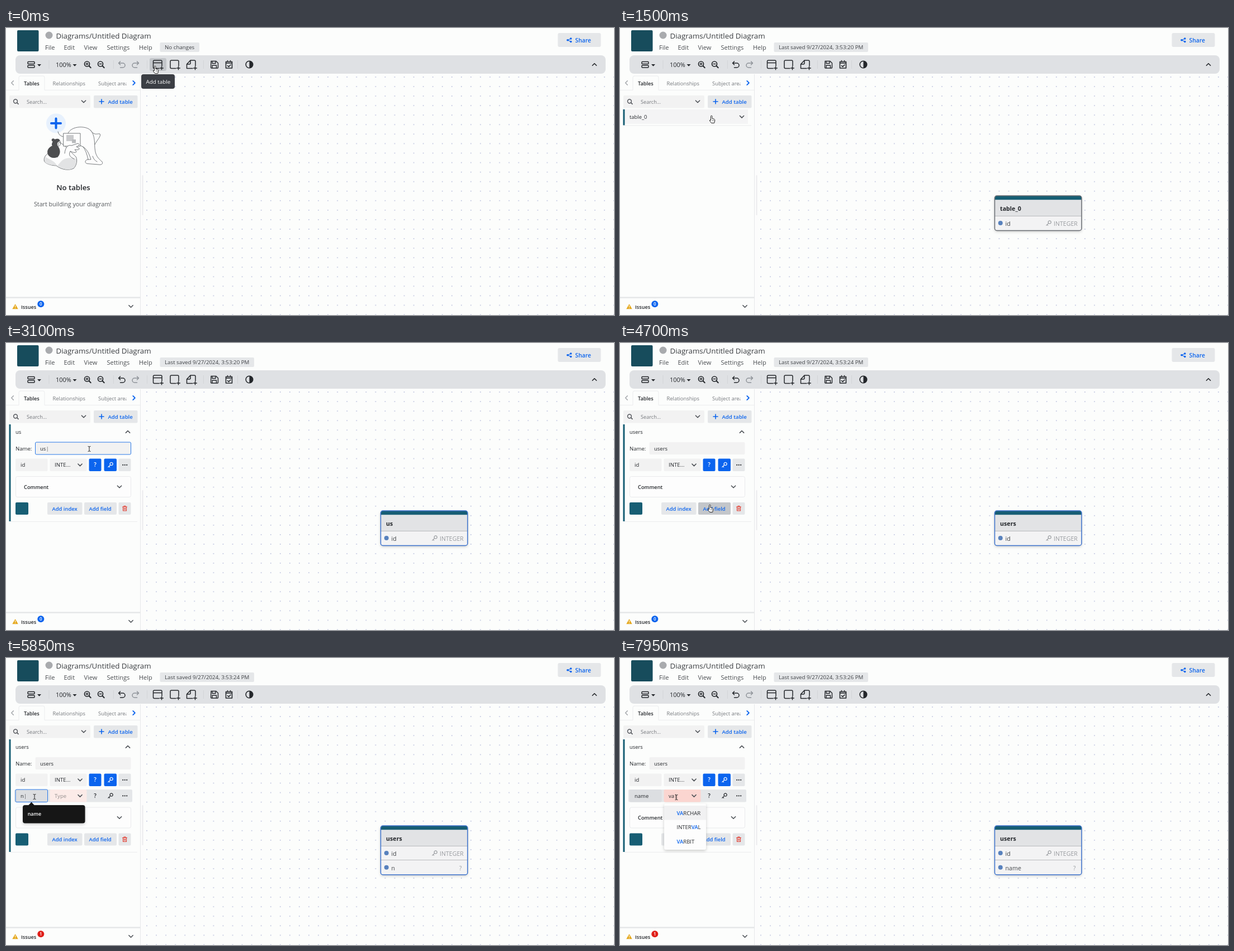
Write an HTML page that moves like this. It is 1088 by 515 pixels and loops after 8 s.

```html
<!DOCTYPE html>
<html lang="en">
<head>
<meta charset="utf-8">
<title>Diagram editor</title>
<style>
html, body { margin: 0; width: 100%; height: 100%; overflow: hidden; background: #fcfdfc; }
svg { display: block; font-family: "Open Sans", "Noto Sans", sans-serif; white-space: pre; }
</style>
</head>
<body>
<svg width="1088" height="515" viewBox="0 0 1088 515">
  <defs>
    <pattern id="dots" x="243.5" y="79.5" width="17.06" height="17.06" patternUnits="userSpaceOnUse">
      <circle cx="8.5" cy="8.5" r=".75" fill="#858fc4"/>
    </pattern>
    <filter id="shadow" x="-20%" y="-20%" width="140%" height="150%">
      <feDropShadow dx="0" dy="2" stdDeviation="2.5" flood-opacity=".2"/>
    </filter>
    <clipPath id="tabClip"><rect x="160" y="86" width="55.5" height="24"/></clipPath>
    <clipPath id="panelClip"><rect id="panelBox" x="0" y="146" width="240" height="0"/></clipPath>
  </defs>
  <g id="base"></g>
  <g id="scene"></g>
</svg>
<script>
const INK = '#24272b', GRAY = '#75787d', BLUE = '#0b64ee', TEAL = '#175e74', BUTTON = '#e5e7e9', FIELD = '#f2f2f2';
const LOOP = 8000;
const base = document.getElementById('base');
const scene = document.getElementById('scene');
const panelBox = document.getElementById('panelBox');

const text = (x, y, size, str, fill = INK, weight = 400, extra = '') =>
  `<text x="${x}" y="${y}" font-size="${size}" fill="${fill}" font-weight="${weight}" ${extra}>${str}</text>`;
const rect = (x, y, w, h, fill, r = 0, extra = '') =>
  `<rect x="${x}" y="${y}" width="${w}" height="${h}" rx="${r}" fill="${fill}" ${extra}/>`;
const circle = (x, y, r, fill, extra = '') => `<circle cx="${x}" cy="${y}" r="${r}" fill="${fill}" ${extra}/>`;
const line = (d, stroke = INK, w = 1.5, fill = 'none') =>
  `<path d="${d}" fill="${fill}" stroke="${stroke}" stroke-width="${w}" stroke-linecap="round" stroke-linejoin="round"/>`;
const shape = (d, fill) => `<path d="${d}" fill="${fill}"/>`;
const group = (x, y, content, extra = '') => `<g transform="translate(${x} ${y})" ${extra}>${content}</g>`;
const chevron = (x, y, angle = 0, color = '#4d5156', w = 1.6) =>
  `<g transform="translate(${x} ${y}) rotate(${angle})">${line('M-3.6 -1.8L0 1.8L3.6 -1.8', color, w)}</g>`;
const plus = (x, y, r, color, w) => line(`M${x - r} ${y}h${2 * r}M${x} ${y - r}v${2 * r}`, color, w);
const key = (x, y, color) => group(x, y,
  circle(1.8, -1.6, 2.6, 'none', `stroke="${color}" stroke-width="1.2"`) + line('M-.2 .4L-4 4.2M-2.6 2.8L-1.2 4.2', color, 1.2));
const more = (x, y) => [-3.5, 0, 3.5].map(d => circle(x + d, y, 1.15, INK)).join('');
const undo = (x, color, flip) =>
  `<g transform="translate(${x} 66) scale(${flip} 1)">${line('M-2.5 -6L-5.5 -3L-2.5 0M-5.5 -3H2A3.9 3.9 0 0 1 2 5H-2.5', color)}</g>`;

function toolbarIcons() {
  const zoom = (x, vertical) => circle(x, 64.5, 4.5, 'none', `stroke="${INK}" stroke-width="1.7"`) +
    line(`M${x + 3.5} 68l3.2 3.2`, INK, 2) + line(`M${x - 2} 64.5h4` + (vertical ? `M${x} 62.5v4` : ''), INK, 1.3);
  return rect(39, 60.5, 12, 4, 'none', 1, `stroke="${INK}" stroke-width="1.5"`) +
    rect(39, 67, 12, 4, 'none', 1, `stroke="${INK}" stroke-width="1.5"`) +
    shape('M56 65h7l-3.5 3.8zM119.500 65h7l-3.500 3.800z', INK) +
    text(89, 70, 10.9, '100%') + zoom(145, true) + zoom(169, false) +
    [76.5, 192, 252, 353, 414].map(x => rect(x, 58, 1, 15, '#d3d5d8')).join('') +
    undo(232, '#8f9399', -1) +
    line('M274 72.500H265.500a2 2 0 0 1-2-2V60a2 2 0 0 1 2-2H277a2 2 0 0 1 2 2V68M263.500 62.500H279', INK, 1.5) + plus(278.5, 72, 2.8, INK, 1.5) +
    line('M304 72.500H296a2 2 0 0 1-2-2V60a2 2 0 0 1 2-2H307a2 2 0 0 1 2 2V68', INK, 1.5) + plus(308.5, 72, 2.8, INK, 1.5) +
    line('M334 72.500H323.500V65L330 58H337a2 2 0 0 1 2 2V68M323.500 65H328a2 2 0 0 0 2-2V58', INK, 1.5) + plus(338.5, 72, 2.8, INK, 1.5) +
    line('M367 59.500h9l3.500 3.500v8a1 1 0 0 1-1 1H368a1.500 1.500 0 0 1-1.500-1.500zM369 59.500v4h6v-4M369 72v-5h7.500v5', INK, 1.4) +
    line('M393.500 60.500h11v11.500h-11zM393.500 63h11M396.500 58.500v2M401.500 58.500v2M396.500 67.500l2 2l3.500-3.500', INK, 1.6) +
    circle(435.5, 65.5, 6.3, 'none', `stroke="${INK}" stroke-width="1.6"`) + shape('M435.500 59.200a6.300 6.300 0 0 1 0 12.600z', INK) +
    chevron(1053, 65.5, 180, INK);
}

function drawBase() {
  const menu = [[70, 'File'], [103.5, 'Edit'], [139.5, 'View'], [180.5, 'Settings'], [238, 'Help']];
  base.innerHTML =
    rect(247, 83, 841, 432, 'url(#dots)') +
    rect(20, 4, 38.5, 38, '#174c5c', 2) + circle(77, 13, 6.5, '#a9abae') +
    text(89.5, 18.5, 13.35, 'Diagrams/Untitled Diagram', '#3b3e42') +
    menu.map(([x, s]) => text(x, 38.8, 11, s, '#4a4d51')).join('') +
    rect(987.5, 9, 77, 25, BUTTON, 3) +
    line('M1011 19L1005 21.700L1011 24.500', BLUE, 1.1) +
    [[1010.8, 19], [1005, 21.7], [1010.8, 24.5]].map(p => circle(...p, 1.8, BLUE)).join('') +
    text(1018.5, 25.8, 10.3, 'Share', BLUE, 600) +
    rect(17, 49, 1056, 33, '#dfe1e4', 8) +
    line('M0 111.500H23V89a3 3 0 0 1 3-3H66a3 3 0 0 1 3 3V111.500H240', '#ebecee', 1) +
    chevron(11.5, 98.5, 90, '#a9acb0') + chevron(229, 98.5, -90, BLUE, 1.8) +
    text(32, 102.8, 9.2, 'Tables', INK, 600) + text(83.5, 102.8, 9.4, 'Relationships', GRAY) +
    `<g clip-path="url(#tabClip)">${text(165, 102.8, 9.4, 'Subject areas', GRAY)}</g>` +
    rect(6, 121, 145, 22.5, FIELD, 2) +
    circle(17, 131.5, 3.4, 'none', 'stroke="#55585d" stroke-width="1.5"') + line('M19.700 134l2.300 2.300', '#55585d', 1.7) +
    text(37, 136, 9.2, 'Search...', GRAY) + chevron(139, 132) +
    rect(157, 121, 78.5, 22.5, BUTTON, 2) + plus(171, 132, 4, BLUE, 1.6) + text(182.5, 136.2, 9.6, 'Add table', BLUE, 600) +
    rect(240, 83, 1, 432, '#e6e7e9') + rect(241, 83, 6, 432, '#fcfcfc') + rect(243.5, 264, 2, 72, '#ececee', 1) +
    rect(0, 482.5, 240, 2.5, '#e6e7e9') +
    shape('M16.500 495.200L21.700 504.200H11.300z', '#e5a81c') + rect(16, 498, 1, 3, '#fff') + rect(16, 502, 1, 1, '#fff') +
    text(27, 503.7, 9.1, 'Issues', INK, 600) + chevron(223.5, 499.5);
}

// Placeholder picture for the list without tables
function emptyState() {
  const pen = (d, fill = 'none') => line(d, '#55585c', .8, fill);
  return circle(89.5, 171, 17.5, '#e7f1fd') +
    pen('M93 186q1 7 9 9') +
    pen('M151 183C158 194 163 189 168 190C171 194 162 202 159 209') +
    pen('M111 189C116 177 137 175 148 181C160 189 158 206 159 216C160 229 165 234 172 240C174 244 171 246 165 245L146 243.500C140 243 141 236 147 236H152C147 220 142 214 133 211', '#fdfdfd') +
    pen('M147 236q-3-15-9-23M155 230q2 7 8 10') +
    pen('M78 224C71 226 67 233 68.500 239C72 245 84 247 90 247C100 255 113 256 121 252C127 246 128 236 125 231C115 222 104 208 95 205C91 209 96 222 92 232', '#fdfdfd') +
    shape('M70 231C76 235 86 238 91 246C82 247 69 244 69 238z', '#e2e3e4') +
    shape('M99 239C107 231 119 233 126 235C126 248 121 254 111 254Q99 253 92 247z', '#e2e3e4') +
    pen('M103 189h30v23h-30z', '#fdfdfd') +
    rect(108, 192, 13, 11, '#c9cacc') + rect(118, 200, 7, 6.5, '#b9bbbd') +
    pen('M105 225C106 214 111 209 117 211L129 207C133 209 130 212 126 213L131 216C132 219 127 219 123 218L126 222C125 225 119 223 115 221C111 229 116 232 122 235', '#fdfdfd') +
    pen('M90 202q4-3 7 1q2 6-2 9') +
    shape('M83 211C80 210 84 201 88 199.500C92 198 97 199 96 203C94 205 91 204 92 211C98 217 98 226 93 231C87 235 78 233 75 227C72 219 77 214 83 211z', '#4d4e50') +
    circle(84.5, 201, 2.8, '#4d4e50') +
    plus(89.5, 171, 8.5, BLUE, 4) +
    text(120.5, 291, 13.2, 'No tables', INK, 600, 'text-anchor="middle"') +
    text(50, 320, 10.7, 'Start building your diagram!', '#55585c');
}

// Returns the newest value of a list of [time, value] steps
const at = (t, steps) => steps.reduce((now, s) => t >= s[0] ? s : now);
const NAME = [[0, 'table_0'], [2900, 'u'], [3050, 'us'], [3250, 'use'], [3400, 'user'], [3550, 'users']];
const COLUMN = [[0, ''], [5750, 'n'], [5950, 'na'], [6100, 'nam'], [6300, 'name']];
const TYPE = [[7250, ''], [7700, 'v'], [7900, 'va']];
const PATH = [[0, 268, 75], [650, 268, 75], [1400, 165, 164], [1800, 165, 164], [2250, 149, 190], [3800, 149, 190],
  [4600, 162, 297], [5000, 162, 297], [5500, 51, 249], [6350, 51, 249], [6750, 73, 248], [6900, 73, 248], [7250, 101, 250], [8000, 101, 250]];
const SHAPES = [[0, 'hand'], [800, 'arrow'], [1300, 'hand'], [2050, 'beam'], [3950, 'arrow'], [4450, 'hand'], [5150, 'arrow'], [5350, 'beam']];
const STATUS = [[0, 'No changes'], [900, 'Last saved 9/27/2024, 3:53:20 PM'], [4150, 'Last saved 9/27/2024, 3:53:24 PM'], [7350, 'Last saved 9/27/2024, 3:53:26 PM']];
const CURSORS = {
  hand: line('M-2.500 1V-5.500a1.200 1.200 0 0 1 2.400 0V-1.500L3.500 -.700Q5 0 4.700 2L3.700 6.500H-1.500L-4.800 2Q-4.600 .200 -2.500 1.500z', '#222', 1, '#fff') + line('M.500 1v2M2.500 1v2', '#222', .6),
  arrow: line('M-3.500 -6V5L-1 2.700L.700 6.500L2.300 5.800L.700 2.300H4z', '#222', .9, '#fff'),
  beam: line('M-2 -4.500Q0 -4.500 0 -3.500Q0 -4.500 2 -4.500M0 -3.500V3.500M-2 4.500Q0 4.500 0 3.500Q0 4.500 2 4.500', '#222', 1)
};
const caret = (t, since) => (t - since) % 1000 < 500 ? '<tspan font-weight="300" fill="#111">|</tspan>' : '';

function pointer(t) {
  const i = Math.max(1, PATH.findIndex(p => p[0] > t));
  const [a, b] = [PATH[i - 1], PATH[i]];
  const u = (t - a[0]) / (b[0] - a[0]), e = u * u * (3 - 2 * u);
  return group(a[1] + (b[1] - a[1]) * e, a[2] + (b[2] - a[2]) * e, CURSORS[at(t, SHAPES)[1]]);
}

function fieldRow(y, name, type, active, nameExtra = '') {
  const color = active ? '#fff' : INK, fill = active ? BLUE : 'none';
  return rect(17, y, 57.5, 22.5, active ? FIELD : '#dcdee1', 2, nameExtra) + text(26, y + 14.7, 9.5, name) +
    type + chevron(132.5, y + 11.3) +
    rect(148.5, y, 22, 22.5, fill, 2) + text(159.5, y + 14.9, 10, '?', color, 600, 'text-anchor="middle"') +
    rect(175.5, y, 22.5, 22.5, fill, 2) + key(186.8, y + 11, color) +
    rect(201.5, y, 22, 22.5, active ? BUTTON : 'none', 2) + more(212.7, y + 11.3);
}

function panel(t, name, hasColumn) {
  const focus = 'stroke="#2878e8" stroke-width="1"';
  const naming = t >= 2350 && t < 4150;
  const selected = t >= 2600 && t < 2900;
  const [typed, label] = at(t, NAME);
  const shift = hasColumn ? 28.5 : 0;
  let out = text(17, 193, 9.6, 'Name:') +
    rect(52.5, 178, 171, 22, FIELD, 2, naming ? focus : '') +
    (selected ? rect(60.5, 182, 33, 14, '#1a73d9') : '') +
    text(61, 193.3, 9.5, label + (naming && !selected ? caret(t, Math.max(typed, 2350)) : ''), selected ? '#fff' : INK) +
    fieldRow(207.5, 'id', rect(78.5, 207.5, 66, 22.5, FIELD, 2) + text(87, 222.3, 9.6, 'INTE...'), true);
  if (hasColumn) {
    const editing = t >= 5550 && t < 7250, choosing = t >= 7250;
    const [when, column] = at(t, COLUMN);
    const [pressed, query] = at(t, TYPE);
    const typeBox = rect(78.5, 236, 66, 22.5, choosing ? '#fbd5d0' : '#fcebe8', 2) +
      text(87, 250.8, 9.6, choosing && query ? query + caret(t, pressed) : 'Type' + (choosing ? caret(t, 7250) : ''), choosing && query ? INK : '#96908f');
    out += (t >= 5350 ? rect(15, 236, 211, 22.5, '#e5e7e9', 2) : rect(148.500, 236, 75, 22.500, BUTTON, 2)) +
      fieldRow(236, column + (editing ? caret(t, Math.max(when, 5550)) : ''), typeBox, false, editing ? focus : '');
  }
  const hover = t >= 4450 && t < 5150 ? '#c3c6ca' : BUTTON;
  out += group(0, shift,
    rect(17.5, 239.5, 206, 37, '#fdfdfd', 3, 'stroke="#e9eaec"') + text(32, 261.8, 9.3, 'Comment', INK, 600) + chevron(203, 258) +
    rect(17, 286, 23, 22, TEAL, 2) +
    rect(74, 286, 62.5, 22, BUTTON, 2) + text(82.5, 300.5, 9.4, 'Add index', BLUE, 600) +
    rect(140, 286, 58, 22, hasColumn ? BUTTON : hover, 2) + text(148.5, 300.5, 9.4, 'Add field', BLUE, 600) +
    rect(201.5, 286, 22, 22, BUTTON, 2) +
    line('M208.500 294h8M211 294v-1.500h3v1.500M209.500 294v7h6v-7M211.500 296v3M213.500 296v3', '#e23b2e', 1.1));
  return out;
}

function sidebar(t, name, hasColumn) {
  const u = Math.min(1, Math.max(0, (t - 1850) / 200));
  const full = hasColumn ? 202 : 174;
  const height = 28.5 + (full - 28.5) * (1 - (1 - u) ** 2);
  panelBox.setAttribute('height', height);
  return (t >= 1250 && t < 2050 ? rect(8, 146, 221, 26, '#f4f4f5') : '') +
    rect(8, 146 + height, 227, 1, '#ececee') +
    `<g clip-path="url(#panelClip)">${rect(5.5, 146, 3, 220, TEAL)}${u > 0 ? panel(t, name, hasColumn) : ''}</g>` +
    text(17, 163, 9.4, name, INK, 500) + chevron(218, 159.3, 180 * u);
}

function canvasTable(t, name, hasColumn) {
  const height = hasColumn ? 88 : 62.5;
  const edge = t >= 1850 ? '#3c72cc' : '#696d73';
  const dot = y => circle(680.8, y, 4, '#5881bd');
  return rect(670.5, 301, 155.5, height, '#f3f3f4', 4, 'filter="url(#shadow)"') +
    shape('M671 308.500V305a4 4 0 0 1 4-4H822a4 4 0 0 1 4 4V308.500z', TEAL) +
    rect(671, 308.5, 155, 28.5, '#e2e3e5') + rect(671, 337, 155, 1, '#b9bbbe') +
    text(680, 327.5, 10.7, name, INK, 700) +
    dot(350) + text(689.5, 354.6, 10.9, 'id', '#44474b') + key(767, 350, '#999ca0') + text(776, 354.6, 10.6, 'INTEGER', '#999ca0') +
    (hasColumn ? rect(671, 362, 155, 1, '#b9bbbe') + dot(375.8) +
      text(689.5, 380.5, 10.7, at(t, COLUMN)[1], '#44474b') + text(811, 380.5, 10.6, '?', '#999ca0') : '') +
    rect(670.5, 301, 155.5, height, 'none', 4, `stroke="${edge}" stroke-width="1.5"`);
}

function popups(t) {
  let out = '';
  if (t < 800) {
    out += rect(242, 83, 60, 26, '#3b3e44', 4) + text(250.5, 100.3, 9.8, 'Add table', '#fff');
  }
  if (t >= 5750 && t < 6300) {
    out += shape('M39.500 265L45.500 258.500L51.500 265z', '#151618') +
      rect(30, 264, 111.5, 32.5, '#151618', 4, 'filter="url(#shadow)"') + text(38.7, 283.3, 8.9, 'name', '#fff', 600);
  }
  if (t >= 7700) {
    const hit = s => `<tspan fill="${BLUE}" font-weight="600">${s}</tspan>`;
    const [v, va] = at(t, TYPE)[1] === 'v' ? ['V', 'A'] : ['VA', ''];
    const options = [hit(v) + va + 'RCHAR', 'INTER' + hit(v) + va + 'L', hit(v) + va + 'RBIT'];
    out += rect(79, 261, 75, 83, '#fdfdfd', 4, 'filter="url(#shadow)"') + rect(79, 265, 75, 25.5, '#f1f1f2') +
      options.map((s, i) => text(101.5, 281.5 + 25.5 * i, 9.5, s)).join('');
  }
  return out;
}

function draw(t) {
  const hasTable = t >= 400, hasColumn = t >= 5000;
  const name = at(t, NAME)[1], status = at(t, STATUS)[1];
  scene.innerHTML =
    rect(275.5, 26, t < 900 ? 70.5 : 168.5, 17, BUTTON, 2) + text(284, 38.3, 9.75, status, '#3e4145') +
    (t < 800 ? rect(257, 54, 30, 23, '#c3c6ca', 3) : '') +
    toolbarIcons() + undo(207, hasTable ? INK : '#8f9399', 1) +
    (hasTable ? sidebar(t, name, hasColumn) + canvasTable(t, name, hasColumn) : emptyState()) +
    circle(62.3, 495.3, 6, hasColumn ? '#e0211b' : BLUE) +
    text(62.3, 498.3, 8, hasColumn ? 1 : 0, '#fff', 600, 'text-anchor="middle"') +
    popups(t) + pointer(t);
}

drawBase();
const start = performance.now();
function tick() {
  draw((performance.now() - start) % LOOP);
  requestAnimationFrame(tick);
}
tick();
</script>
</body>
</html>
```
